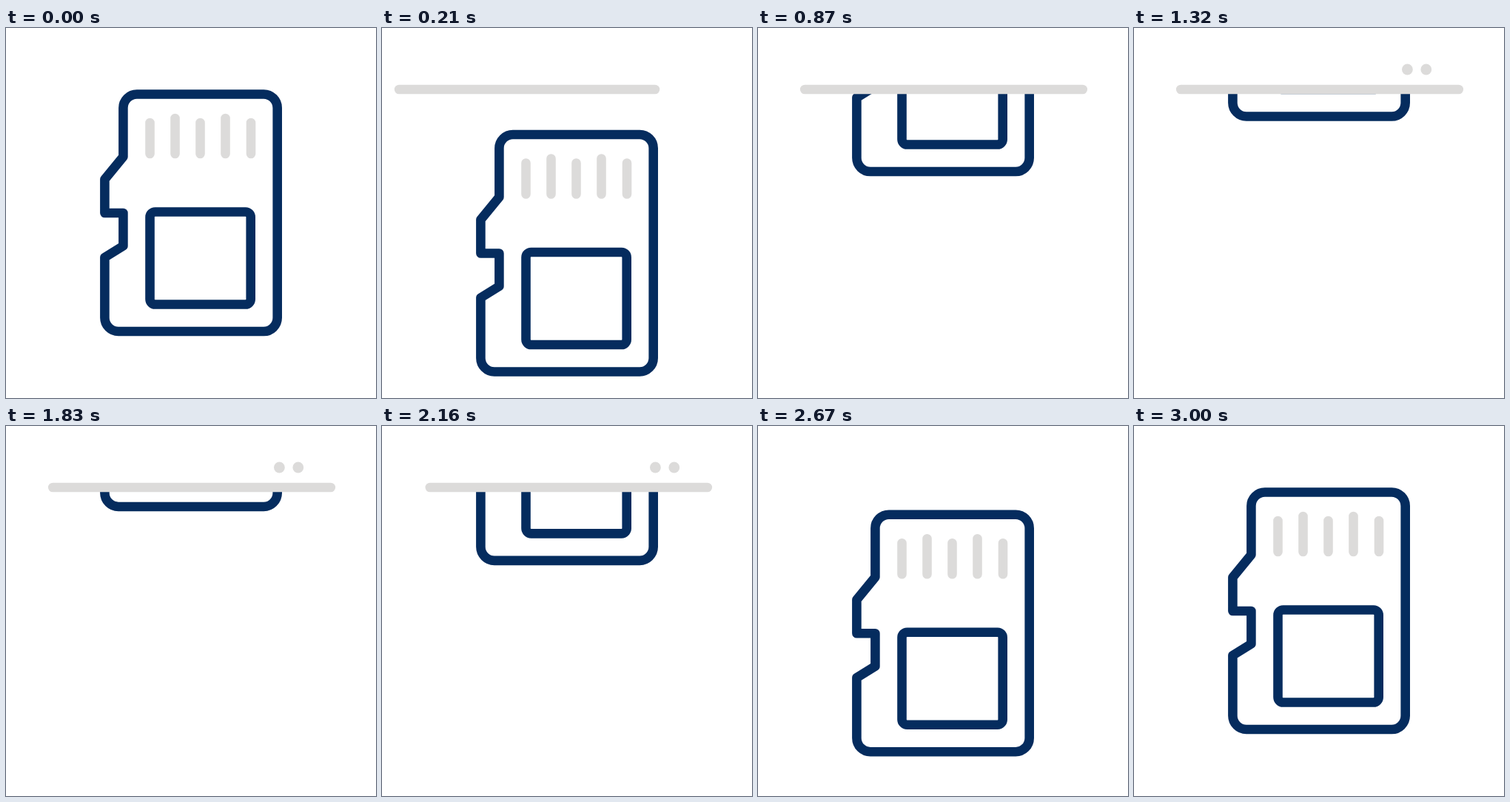
Recreate the animation shown at these times as an HTML page. Size 500 by 500 pixels, loop 3590 ms.

```html
<!DOCTYPE html>
<html lang="en">
<head>
<meta charset="utf-8">
<title>Memory card</title>
<style>
  html, body { margin: 0; width: 100%; height: 100%; overflow: hidden; background: #fff; }
  svg { display: block; width: 100%; height: 100%; fill: none; stroke-width: 12.6; stroke-linecap: round; stroke-linejoin: round; }
  .navy { stroke: #052c5e; }
  .grey { stroke: #dcdbda; }
  .dot { fill: #dcdbda; }
</style>
</head>
<body>
<svg viewBox="0 0 500 500">
  <clipPath id="slot"><rect y="83" width="500" height="417"/></clipPath>
  <g clip-path="url(#slot)">
    <g id="card">
      <path class="grey" d="M194.5 128V170M228.5 122V170M262.5 128V170M296.5 122V170M331 128V170"/>
      <path class="navy" d="M158.4 174V108A18.5 18.5 0 0 1 177 89.5H348A18.5 18.5 0 0 1 366.7 108V391.5A18.5 18.5 0 0 1 348 410H152A18.5 18.5 0 0 1 133.4 391.5V310L158.4 294.5V250H133.4V204.5Z"/>
      <rect class="navy" x="194.5" y="248.5" width="136.2" height="125" rx="7"/>
    </g>
  </g>
  <path id="line" class="grey"/>
  <circle id="left" class="dot" cx="369.4" cy="56" r="7.4"/>
  <circle id="right" class="dot" cx="394.8" cy="56" r="7.4"/>
</svg>
<script>
  const LOOP = 3590, STEP = 30, LAST = 100;
  const $ = id => document.getElementById(id);
  const card = $('card'), line = $('line'), left = $('left'), right = $('right');

  // Card offset: [step, y]
  const moves = [[0, 0], [11, 69], [12.4, 69], [39.2, -305], [44, -290.5],
                 [58, -290.5], [63, -305], [87, 31], [100, 0]];

  // cubic-bezier(.6, 0, .4, 1), solved by bisection
  function ease(x) {
    let lo = 0, hi = 1;
    for (let i = 0; i < 24; i++) {
      const s = (lo + hi) / 2, r = 1 - s;
      if (1.8 * r * r * s + 1.2 * r * s * s + s * s * s < x) lo = s; else hi = s;
    }
    return lo * lo * (3 - 2 * lo);
  }

  function cardY(n) {
    const i = Math.max(1, moves.findIndex(m => m[0] >= n));
    const [n0, y0] = moves[i - 1], [n1, y1] = moves[i];
    return y0 + (y1 - y0) * ease((n - n0) / (n1 - n0));
  }

  // The line glides in from the left and speeds out to the right, shorter when far away.
  function drawLine(n) {
    const entering = n < 45;
    const shift = entering ? -55 * Math.exp(-0.364 * (n - 7)) : 27 * Math.exp(0.38 * (n - 80));
    const half = Math.max(0, 187.8 - Math.abs(shift) * (entering ? 0.27 : 0.22));
    const mid = 251 + shift;
    line.setAttribute('d', `M${mid - half} 83H${mid + half}`);
    line.style.display = n > 0 && n < 88 ? '' : 'none';
  }

  const within = (n, spans) => spans.some(([a, b]) => n >= a && n < b);
  const show = (el, on) => { el.style.display = on ? '' : 'none'; };

  function draw(ms) {
    const n = Math.min(LAST, Math.floor(ms % LOOP / STEP));
    card.setAttribute('transform', `translate(0 ${cardY(n)})`);
    drawLine(n);
    show(left, within(n, [[30, 82]]));
    show(right, within(n, [[34, 48], [51, 54], [58, 78]]));
  }

  const start = performance.now();
  function tick() {
    draw(performance.now() - start);
    requestAnimationFrame(tick);
  }
  tick();
</script>
</body>
</html>
```
